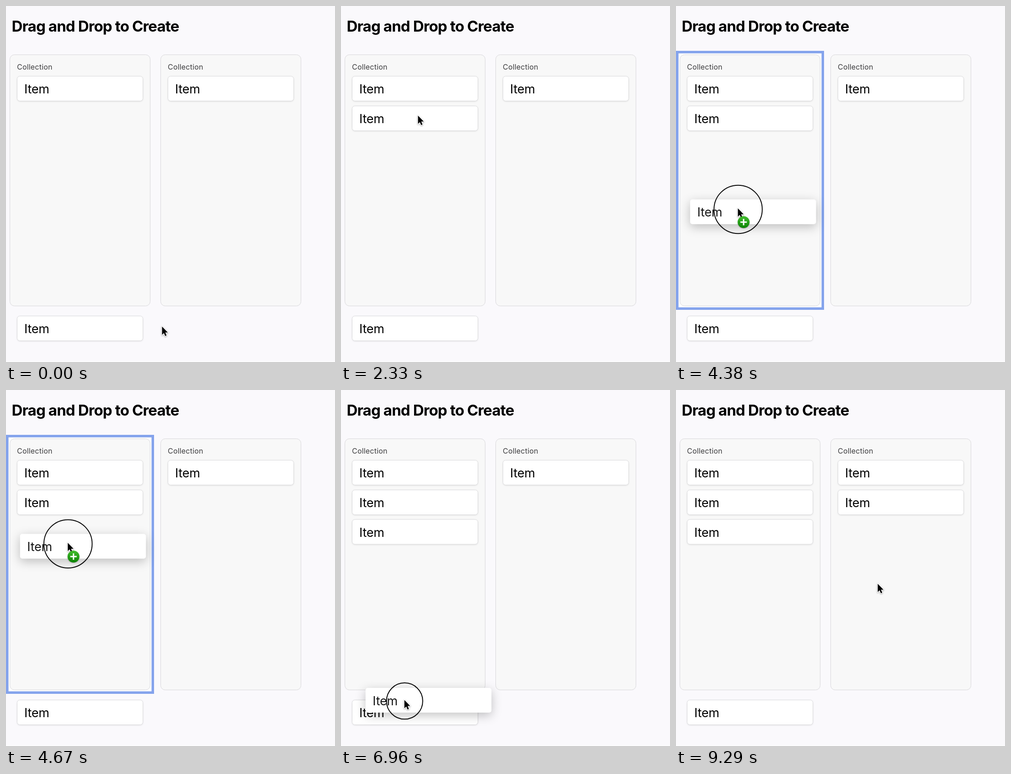
An HTML page for the animation above (9680 ms loop, 720 by 778 pixels).

```html
<!DOCTYPE html>
<html lang="en">
<head>
<meta charset="utf-8">
<title>Drag and Drop to Create</title>
<style>
  html, body { margin: 0; width: 100%; height: 100%; overflow: hidden; background: #faf9fc; }
  svg { display: block; width: 100%; height: 100%; font-family: Inter, "Liberation Sans", sans-serif; }
  .title { font-size: 33px; font-weight: 700; letter-spacing: -.86px; }
  .label { font-size: 16px; letter-spacing: .2px; fill: #3c3c3e; }
  .name { font-size: 27px; letter-spacing: -.2px; }
  .column { fill: #f8f8f8; stroke: #d8d7da; }
  .glow { fill: #fff; stroke: #84a3ec; stroke-width: 5.5; }
  .card { fill: #fff; stroke: #dcdcde; filter: drop-shadow(0 1.5px 1.5px rgba(0, 0, 0, .1)); }
  .lifted { fill: #fff; filter: drop-shadow(0 6px 11px rgba(0, 0, 0, .24)); }
  .arrow { stroke: #fff; stroke-width: 2.6; paint-order: stroke; stroke-linejoin: round;
    filter: drop-shadow(0 1.5px 1.5px rgba(0, 0, 0, .35)); }
  .badge { filter: drop-shadow(0 1px 1px rgba(0, 0, 0, .3)); }
</style>
</head>
<body>
<svg viewBox="0 0 720 778">
  <defs>
    <linearGradient id="green" x1="0" y1="0" x2="0" y2="1">
      <stop offset="0" stop-color="#42bd2e"/>
      <stop offset="1" stop-color="#0b8203"/>
    </linearGradient>
    <g id="card">
      <rect class="card" x=".5" y=".5" width="275" height="54" rx="6"/>
      <text class="name" x="16" y="38">Item</text>
    </g>
    <g id="column">
      <rect class="column" x="8.5" y="106.5" width="307" height="549" rx="10"/>
      <text class="label" x="24" y="139">Collection</text>
      <use href="#card" x="24" y="153"/>
    </g>
    <rect id="glow" class="glow" x="2.75" y="100.75" width="318.5" height="560.5"/>
  </defs>
  <rect width="720" height="778" fill="#faf9fc"/>
  <rect y="777" width="720" height="1" fill="#fff"/>
  <text class="title" x="12.5" y="55.5">Drag and Drop to Create</text>
  <use id="glow0" href="#glow"/>
  <use id="glow1" href="#glow" x="330"/>
  <use href="#column"/>
  <use href="#column" x="330"/>
  <use id="drop0" href="#card" x="24" y="218"/>
  <use id="drop1" href="#card" x="24" y="282.5"/>
  <use id="drop2" href="#card" x="354" y="218"/>
  <use href="#card" x="24" y="677"/>
  <g id="lifted">
    <rect class="lifted" width="275.5" height="54" rx="5"/>
    <text class="name" x="15.5" y="37.5" fill="#161616">Item</text>
  </g>
  <g id="pointer">
    <circle id="ring" cx="1" cy="2.7" fill="none" stroke="#0a0a0a" stroke-width="2"/>
    <path class="arrow" d="M.5 .5V18.6L4.6 14.7L7.4 21.2L10.4 19.9L7.6 13.5H13.2Z"/>
    <g id="badge" class="badge" transform="translate(13 30.5)">
      <circle r="13" fill="url(#green)"/>
      <path d="M-7 0H7M0 -7V7" stroke="#fff" stroke-width="3"/>
    </g>
  </g>
</svg>
<script>
const LOOP = 9680;
const HOME = [341, 700];

// Each trip: approach, press, drag along a curve, release. Times in ms.
const trips = [
  { go: 210, there: 630, press: 960, drag: 1210, stop: 2170, up: 2250, end: 2330,
    grab: [178.5, 687], bend: [167, 463], drop: [168, 239], hold: [-154.5, -11] },
  { go: 2750, there: 3420, press: 3920, drag: 4090, stop: 4920, up: 5210, end: 5290,
    grab: [128.5, 702], bend: [137, 508], drop: [134.5, 315], hold: [-104, -19] },
  { go: 5540, there: 6290, press: 6710, drag: 6920, stop: 7460, up: 8000, end: 8040,
    grab: [108.5, 702], bend: [275, 562], drop: [441, 423], hold: [-84.5, -26] }
];

const $ = id => document.getElementById(id);
const show = (id, on) => $(id).setAttribute("visibility", on ? "visible" : "hidden");
const move = (id, [x, y]) => $(id).setAttribute("transform", `translate(${x} ${y})`);
const part = (t, a, b) => Math.min(1, Math.max(0, (t - a) / (b - a)));
const smooth = u => u * u * (3 - 2 * u);
const mix = (a, b, u) => a.map((v, i) => v + (b[i] - v) * u);
const curve = (a, b, c, u) => mix(mix(a, b, u), mix(b, c, u), u);

// Quick pull with a long, settling tail.
const settle = u => 1 - (1 + 6.5 * u) * Math.exp(-6.5 * u);
const pull = u => settle(u) / settle(1);

function pointerAt(t) {
  let at = HOME;
  for (const p of trips) {
    if (t < p.go) break;
    at = t < p.drag
      ? mix(at, p.grab, smooth(part(t, p.go, p.there)))
      : curve(p.grab, p.bend, p.drop, pull(part(t, p.drag, p.stop)));
  }
  return at;
}

function draw(t) {
  const at = pointerAt(t);
  const trip = trips.find(p => t >= p.press && t < p.end);
  const dragging = trip && t >= trip.drag + 40;
  const held = dragging && t < trip.end - 40;
  const over = left => Boolean(dragging && at[1] < 656 && at[0] > left && at[0] < left + 307);
  const targets = [over(8), over(338)];

  targets.forEach((on, i) => show("glow" + i, on && held));
  trips.forEach((p, i) => show("drop" + i, t >= p.end - 40));
  show("badge", targets.includes(true));
  show("lifted", held);
  show("ring", trip && t < trip.up);
  move("pointer", at);
  if (trip) {
    move("lifted", [at[0] + trip.hold[0], at[1] + trip.hold[1]]);
    $("ring").setAttribute("r", 30.5 + 22.3 * part(t, trip.drag, trip.drag + 100));
  }
}

const start = performance.now();
function tick() {
  draw((performance.now() - start) % LOOP);
  requestAnimationFrame(tick);
}
tick();
</script>
</body>
</html>
```
